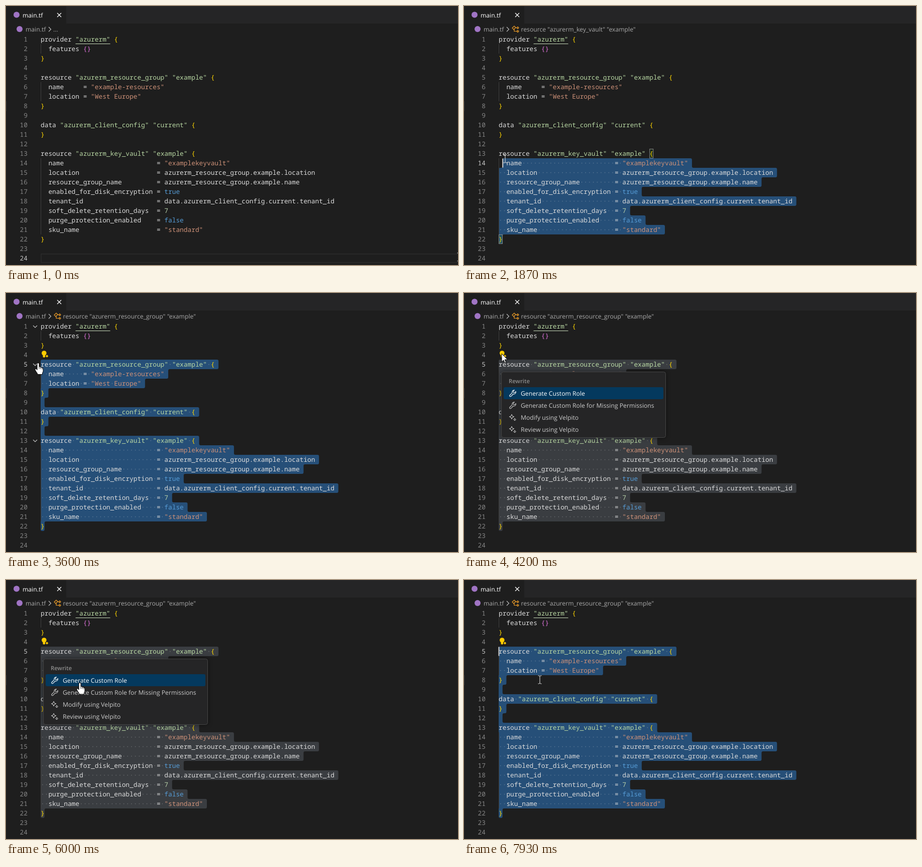
Recreate the animation shown at these times as an HTML page. Size 900 by 517 pixels, loop 8000 ms.

```html
<!DOCTYPE html>
<html lang="en">
<head>
<meta charset="utf-8">
<title>main.tf</title>
<style>
  html, body { margin: 0; height: 100%; overflow: hidden; background: #1e1e1e; }
  svg { display: block; width: 100%; height: 100%; }
  text { white-space: pre; text-rendering: geometricPrecision; }
  .ui { font: 12.2px "Open Sans", "Noto Sans", sans-serif; fill: #ccc; }
  .ui .dim { fill: #a9a9a9; }
  .code { font: 12.83px "Noto Sans Mono", "DejaVu Sans Mono", monospace; fill: #dcdcdc; }
  .label { fill: #b8d7a3; }
  .string { fill: #ce9178; }
  .brace { fill: #ffd700; }
  .inner { fill: #da70d6; }
  .bool { fill: #569cd6; }
  .number { fill: #b5cea8; }
  .line-no { fill: #858585; text-anchor: end; }
  .line-no.on { fill: #c6c6c6; }
  .dots { fill: #e3e4e2; opacity: .27; }
  .stroke { fill: none; stroke: #c5c5c5; stroke-width: 1.1; }
  .pointer { fill: #fff; stroke: #000; }
  #menu .frame { fill: #252526; stroke: #454545; filter: drop-shadow(0 0 4px rgba(0, 0, 0, .5)); }
  #menu .head { font-size: 11.4px; font-weight: 600; fill: #8e8e8e; }
  #menu .on { fill: #fff; }
  #menu .on .stroke { stroke: #fff; }
</style>
</head>
<body>
<svg viewBox="0 0 900 517" xml:space="preserve">
  <defs>
    <path id="wrench" d="M3.2-6.2A4 4 0 0 0-1-.8L-5.8 4A1.6 1.6 0 0 0-3.5 6.3L1.2 1.5A4 4 0 0 0 6.3-3.2L3.8-1 1.3-1.8.9-3.8Z"/>
    <path id="sparkle" d="M-2-6Q-1.4-1.6 3-1Q-1.4-.4-2 4Q-2.6-.4-7-1Q-2.6-1.6-2-6ZM4 2Q4.3 4.2 6.7 4.5Q4.3 4.8 4 7Q3.7 4.8 1.3 4.5Q3.7 4.2 4 2Z"/>
  </defs>
  <rect width="900" height="517" fill="#1e1e1e"/>
  <rect x="120" width="780" height="35" fill="#252526"/>
  <rect y="190" width="1" height="20" fill="#333"/>

  <g class="ui">
    <circle cx="21" cy="17.500" r="6" fill="#a074c4"/>
    <text x="33" y="22.500" fill="#fff">main.tf</text>
    <path class="stroke" d="M102 14l8 8m0-8l-8 8" style="stroke:#fff;stroke-width:1.3"/>
    <circle cx="27" cy="46" r="6" fill="#a074c4"/>
    <text class="dim" x="39" y="50.500">main.tf</text>
    <path class="stroke" d="M85 42l4.500 4.500-4.500 4.500"/>
    <text class="dim" id="crumb" y="50.500"></text>
    <path id="symbol" fill="none" stroke="#ee9d28" stroke-width="1.2"
      d="M96 44l4-4 3 3-4 4zM102 43.500h3M100 46v4.500h5M105 43.500l2-2 2 2-2 2zM105 50.500l2-2 2 2-2 2z"/>
  </g>

  <rect id="current" x="70" width="840" height="17" fill="none" stroke="#282828" stroke-width="2"/>
  <path id="selection"/>
  <g id="brackets" fill="rgba(0,100,0,.15)" stroke="#888"></g>
  <g id="code" class="code"></g>
  <path d="M138.500 75.500H207.500" stroke="#c9dcbc"/>
  <rect id="caret" width="2" height="18" fill="#d0d0d0"/>
  <path id="folds" class="stroke" d="M54 65l4 4 4-4M54 141l4 4 4-4M54 293l4 4 4-4"/>
  <g id="bulb" fill="#fc0">
    <circle cx="75.800" cy="120" r="4.800"/>
    <rect x="73.500" y="123" width="4.500" height="5.500" rx="1"/>
    <path d="M81.500 123l3 3-3 3-3-3z" stroke="#1e1e1e" stroke-width=".6"/>
  </g>

  <g id="menu" class="ui">
    <rect class="frame" x="74.500" y="157.500" width="327" height="131" rx="4"/>
    <text class="head" x="89" y="180">Rewrite</text>
    <rect id="focused" x="79" width="318" height="24" rx="3" fill="#04395e"/>
  </g>

  <g id="mouse">
    <path id="beam" fill="none" stroke="#e8e8e8" d="M-3.500-8H-1.500L0-7 1.500-8H3.500M0-7V7M-3.500 8H-1.500L0 7 1.500 8H3.500"/>
    <path id="arrow" class="pointer" d="M0 0V16.500L3.800 13 6.300 18.600 8.700 17.500 6.300 12H11.600Z"/>
    <g id="hand" class="pointer">
      <path d="M-2 2Q-2 0 0 0Q2 0 2 2V7.500Q5 6.800 5 9Q8 8 8 10Q10 9.500 10 11.500V16Q10 18 8.500 20V23H-1.500V21Q-4 18-6 14Q-6.500 12-5 11.500Q-3.500 11.500-2 14Z"/>
      <path d="M2 7.500V12M5 9V12.500M8 10V13" stroke-width=".8"/>
    </g>
  </g>
</svg>

<script>
const LOOP = 8000, STEP = 1000 / 15;
const LEFT = 69, TOP = 57, ROW = 19, CHAR = 7.698;
const CLICK = 1400, RELEASE = 3270, MENU_OPEN = 4130, MENU_CLOSE = 7860;

const codeLines = `provider "azurerm" {
  features {}
}

resource "azurerm_resource_group" "example" {
  name     = "example-resources"
  location = "West Europe"
}

data "azurerm_client_config" "current" {
}

resource "azurerm_key_vault" "example" {
  name                        = "examplekeyvault"
  location                    = azurerm_resource_group.example.location
  resource_group_name         = azurerm_resource_group.example.name
  enabled_for_disk_encryption = true
  tenant_id                   = data.azurerm_client_config.current.tenant_id
  soft_delete_retention_days  = 7
  purge_protection_enabled    = false
  sku_name                    = "standard"
}

`.split("\n");
const blocks = [[5, 8], [10, 11], [13, 22]];
const anchor = { line: 22, col: 1 };
const items = [
  ["wrench", "Generate Custom Role"],
  ["wrench", "Generate Custom Role for Missing Permissions"],
  ["sparkle", "Modify using Velpito"],
  ["sparkle", "Review using Velpito"],
];

// time, x, y of the pointer's hot spot
const route = [
  [133, 902, 501], [200, 860, 508], [266, 620, 430], [333, 330, 320], [400, 208, 277],
  [600, 208, 277], [1000, 140, 390], [CLICK, 80, 464], [1500, 80, 460], [1866, 82, 305],
  [2330, 74, 198], [2800, 70, 152], [3070, 69, 147], [3270, 69, 147],
  [3330, 63, 142], [3530, 63, 142], [3600, 64, 139.5], [4000, 75, 121],
  [4800, 75, 121], [5300, 98, 160], [5666, 122, 192], [5800, 148, 195], [5866, 154, 200],
  [6000, 147, 205], [6466, 147, 205], [6666, 150, 224], [6866, 152, 216],
  [7200, 152, 216], [7266, 152.5, 213], [7730, 151, 199],
];
const cursors = [[0, "beam"], [3330, "hand"], [3660, "beam"], [3800, "hand"],
  [MENU_OPEN, "arrow"], [5600, "hand"], [MENU_CLOSE, "beam"]];

const $ = id => document.getElementById(id);
const rowTop = line => TOP + ROW * (line - 1);
const colX = col => LEFT + CHAR * col;
const show = (el, on) => el.setAttribute("visibility", on ? "visible" : "hidden");

function add(owner, tag, attrs, text = "") {
  const el = document.createElementNS("http://www.w3.org/2000/svg", tag);
  for (const key in attrs) el.setAttribute(key, attrs[key]);
  el.textContent = text;
  return owner.appendChild(el);
}

function tokenClass(token, line) {
  if (token[0] === '"') return line.includes("=") ? "string" : "label";
  if (/^[{}]$/.test(token)) return line.includes("{}") ? "inner" : "brace";
  if (/^(true|false)$/.test(token)) return "bool";
  return /^\d+$/.test(token) ? "number" : "";
}

const rows = codeLines.map((line, i) => {
  const y = rowTop(i + 1) + 14, code = $("code");
  const number = add(code, "text", { class: "line-no", x: 43, y }, i + 1);
  if (line.startsWith("  ")) add(code, "rect", { x: LEFT, y: rowTop(i + 1), width: 1, height: ROW, fill: "#404040" });
  const dots = add(code, "text", { class: "dots", x: LEFT, y });
  const text = add(code, "text", { x: LEFT, y });
  for (const part of line.split(/("[^"]*"|[{}]|\btrue\b|\bfalse\b|\b\d+\b)/))
    if (part) add(text, "tspan", { class: tokenClass(part, line) }, part);
  return { number, dots };
});

const menuRows = items.map(([icon, label], i) => {
  const y = 200 + 24 * i, row = add($("menu"), "g", {});
  add(row, "use", { href: "#" + icon, class: "stroke", transform: `translate(97 ${y})` });
  add(row, "text", { x: 113, y: y + 4.5 }, label);
  return row;
});
const marks = [0, 1].map(() => add($("brackets"), "rect", { width: 7, height: 18 }));

function mouseAt(t) {
  const next = route.findIndex(p => p[0] > t);
  if (next === 0) return route[0].slice(1);
  if (next < 0) return route[route.length - 1].slice(1);
  const a = route[next - 1], b = route[next], f = (t - a[0]) / (b[0] - a[0]);
  return [1, 2].map(i => a[i] + (b[i] - a[i]) * f);
}

function caretAt(t) {
  if (t < CLICK) return { line: 24, col: 0 };
  const [x, y] = mouseAt(Math.min(t, RELEASE - 1));
  const line = Math.min(22, Math.max(5, Math.floor((y - TOP) / ROW) + 1));
  const col = Math.max(0, Math.floor((x - LEFT) / CHAR));
  return { line, col: Math.min(col, codeLines[line - 1].length) };
}

function roundedPath(points, radius) {
  return points.map((p, i) => {
    const toward = q => {
      const d = Math.hypot(q[0] - p[0], q[1] - p[1]) || 1, k = Math.min(radius, d / 2) / d;
      return [p[0] + (q[0] - p[0]) * k, p[1] + (q[1] - p[1]) * k];
    };
    const from = toward(points.at(i - 1)), to = toward(points[(i + 1) % points.length]);
    return `${i ? "L" : "M"}${from}Q${p} ${to}`;
  }).join("") + "Z";
}

function selectionPath({ line, col }) {
  const points = [[colX(col), rowTop(line)]];
  for (let n = line; n <= anchor.line; n++) {
    const right = colX(n === anchor.line ? anchor.col : codeLines[n - 1].length + 1);
    points.push([right, rowTop(n)], [right, rowTop(n + 1)]);
  }
  points.push([LEFT, rowTop(anchor.line + 1)]);
  if (col) points.push([LEFT, rowTop(line + 1)], [colX(col), rowTop(line + 1)]);
  return roundedPath(points, 3);
}

function drawEditor(t, active) {
  const caret = caretAt(t), picked = caret.line < anchor.line;
  rows.forEach(({ number, dots }, i) => {
    const n = i + 1, from = n === caret.line ? caret.col : 0;
    number.classList.toggle("on", n === caret.line);
    dots.textContent = picked && n >= caret.line && n <= anchor.line
      ? [...codeLines[i]].map((c, k) => c === " " && k >= from ? "·" : " ").join("") : "";
  });
  $("selection").setAttribute("d", picked ? selectionPath(caret) : "");
  $("selection").setAttribute("fill", active ? "#264f78" : "#3a3d41");

  show($("current"), !picked);
  $("current").setAttribute("y", rowTop(caret.line) + 1);
  show($("caret"), (t >= CLICK && t < 3300) || t > 7900);
  $("caret").setAttribute("x", colX(caret.col) - 0.5);
  $("caret").setAttribute("y", rowTop(caret.line) + 0.5);

  const pair = blocks.find(([a, b]) => caret.line > a && caret.line <= b);
  show($("brackets"), pair);
  if (pair) pair.forEach((n, i) => {
    marks[i].setAttribute("x", colX(codeLines[n - 1].length - 1) + 0.5);
    marks[i].setAttribute("y", rowTop(n) + 0.5);
  });

  // the breadcrumb trails the caret a little
  const past = caretAt(t - 150).line;
  const block = blocks.find(([a, b]) => past >= a && past <= b);
  show($("symbol"), block);
  $("crumb").setAttribute("x", block ? 113.5 : 94);
  $("crumb").textContent = block ? codeLines[block[0] - 1].slice(0, -2) : "...";
  show($("folds"), t >= 3320 && t < 3700);
  show($("bulb"), t >= 3060);
}

function drawMenu(y, opened) {
  $("menu").style.display = opened ? "" : "none";
  const index = y < 164 ? 0 : Math.floor((y - 188) / 24);
  show($("focused"), index >= 0);
  $("focused").setAttribute("y", 188 + 24 * index);
  menuRows.forEach((row, i) => row.setAttribute("class", i === index ? "on" : ""));
}

function draw(t) {
  const [x, y] = mouseAt(t), opened = t >= MENU_OPEN && t < MENU_CLOSE;
  drawEditor(t, !opened);
  drawMenu(y, opened);
  const cursor = cursors.filter(c => c[0] <= t).pop()[1];
  for (const id of ["beam", "arrow", "hand"]) show($(id), id === cursor);
  $("mouse").setAttribute("transform", `translate(${x} ${y})`);
}

const began = performance.now();
let shown = -1;
function tick() {
  const t = (performance.now() - began) % LOOP;
  const step = Math.floor((t + 3.4) / STEP) % Math.round(LOOP / STEP);
  if (step !== shown) draw((shown = step) * STEP);
  requestAnimationFrame(tick);
}
tick();
</script>
</body>
</html>
```
